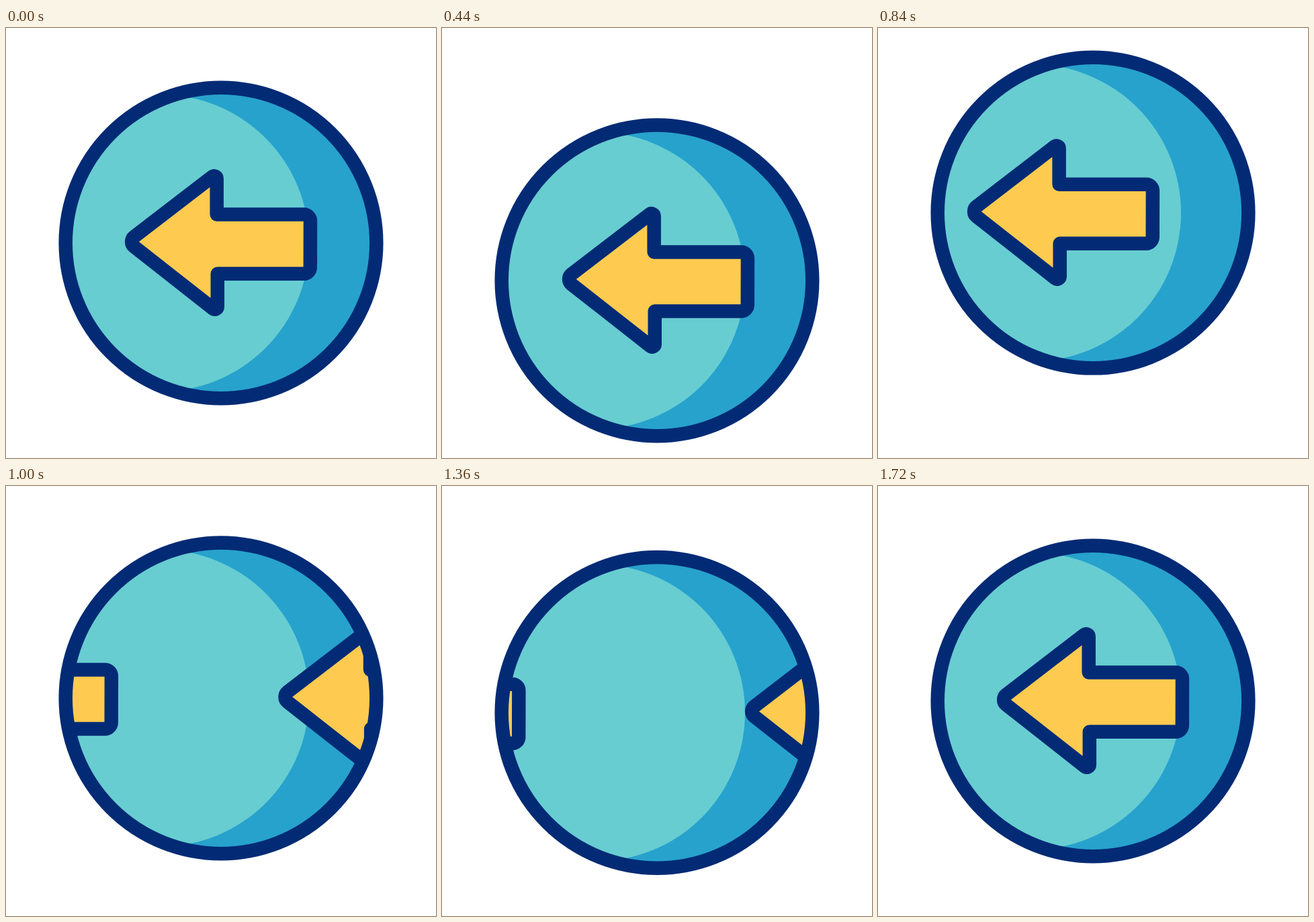
Recreate the animation shown at these times as an HTML page with a canvas. Size 640 by 640 pixels, loop 2000 ms.

```html
<!DOCTYPE html>
<html lang="en">
<head>
<meta charset="utf-8">
<title>Back button</title>
<style>
  html, body { margin: 0; width: 100%; height: 100%; overflow: hidden; background: #fff; }
  canvas { display: block; width: 100%; height: 100%; }
</style>
</head>
<body>
<canvas id="stage" width="640" height="640"></canvas>
<script>
const ctx = document.getElementById('stage').getContext('2d');
const LOOP = 2000, STEP = 40, END = 1680;
const NAVY = '#032b75', TEAL = '#67cdd1', BLUE = '#27a2cd', YELLOW = '#fecb50';

const clamp = x => Math.min(1, Math.max(0, x));

// Smoothstep; a positive skew starts faster and settles longer.
function ease(x, skew = 0) {
  x = clamp(x);
  x += skew * x * (1 - x);
  return x * x * (3 - 2 * x);
}

// Vertical swing of the whole button: each turning point eases from the one before.
const turns = [
  { at: 0, y: 0 },
  { at: 400, y: 60, skew: 0 },
  { at: 800, y: -47.5, skew: 0.2 },
  { at: 1200, y: 35.5, skew: 0.06 },
  { at: END, y: 0, skew: 0.78 }
];
const bounce = t => turns.slice(1).reduce((y, turn, i) => {
  const from = turns[i];
  return y + (turn.y - from.y) * ease((t - from.at) / (turn.at - from.at), turn.skew);
}, 0);

// Horizontal offsets of the arrow's passes: wind up and launch, cruise twice, brake to rest.
const WINDUP = 375, BRAKE = 320;
const cruise = (t, center) => 1.575 * (center - t);
const passes = [
  t => 18 * ease(t / WINDUP) - 0.0038 * Math.max(0, t - WINDUP) ** 2,
  t => cruise(t, 812),
  t => cruise(t, 1145),
  t => 274 * (Math.max(0, END - t) / BRAKE) ** 2
];

function roundedPolygon(corners) {
  const path = new Path2D(), n = corners.length;
  const [ax, ay] = corners[n - 1], [bx, by] = corners[0];
  path.moveTo((ax + bx) / 2, (ay + by) / 2);
  corners.forEach(([x, y, r], i) => {
    const [nx, ny] = corners[(i + 1) % n];
    path.arcTo(x, y, nx, ny, r);
  });
  path.closePath();
  return path;
}

function disc(x, r) {
  const path = new Path2D();
  path.arc(x, 320, r, 0, Math.PI * 2);
  return path;
}

const rim = disc(320, 231.3), light = disc(230, 221);
const arrow = roundedPolygon([
  [181.2, 318, 9.4], [313.7, 216.2, 4], [313.7, 277.6, 0],
  [453, 277.6, 9.5], [452.8, 365.7, 9.5], [314.8, 365.7, 0], [314.8, 422.9, 4]
]);

function fill(path, color) {
  ctx.fillStyle = color;
  ctx.fill(path);
}

function draw(t) {
  ctx.clearRect(0, 0, 640, 640);
  ctx.save();
  ctx.translate(0, bounce(t));
  ctx.strokeStyle = NAVY;
  ctx.lineWidth = 20.5;
  ctx.lineJoin = 'round';

  ctx.save();
  ctx.clip(rim);
  fill(rim, BLUE);
  fill(light, TEAL);
  for (const offset of passes) {
    ctx.save();
    ctx.translate(offset(t), 0);
    fill(arrow, YELLOW);
    ctx.stroke(arrow);
    ctx.restore();
  }
  ctx.restore();

  ctx.stroke(rim);
  ctx.restore();
}

const start = performance.now();
function tick() {
  const t = (performance.now() - start) % LOOP;
  draw(Math.floor(t / STEP) * STEP);
  requestAnimationFrame(tick);
}
tick();
</script>
</body>
</html>
```
